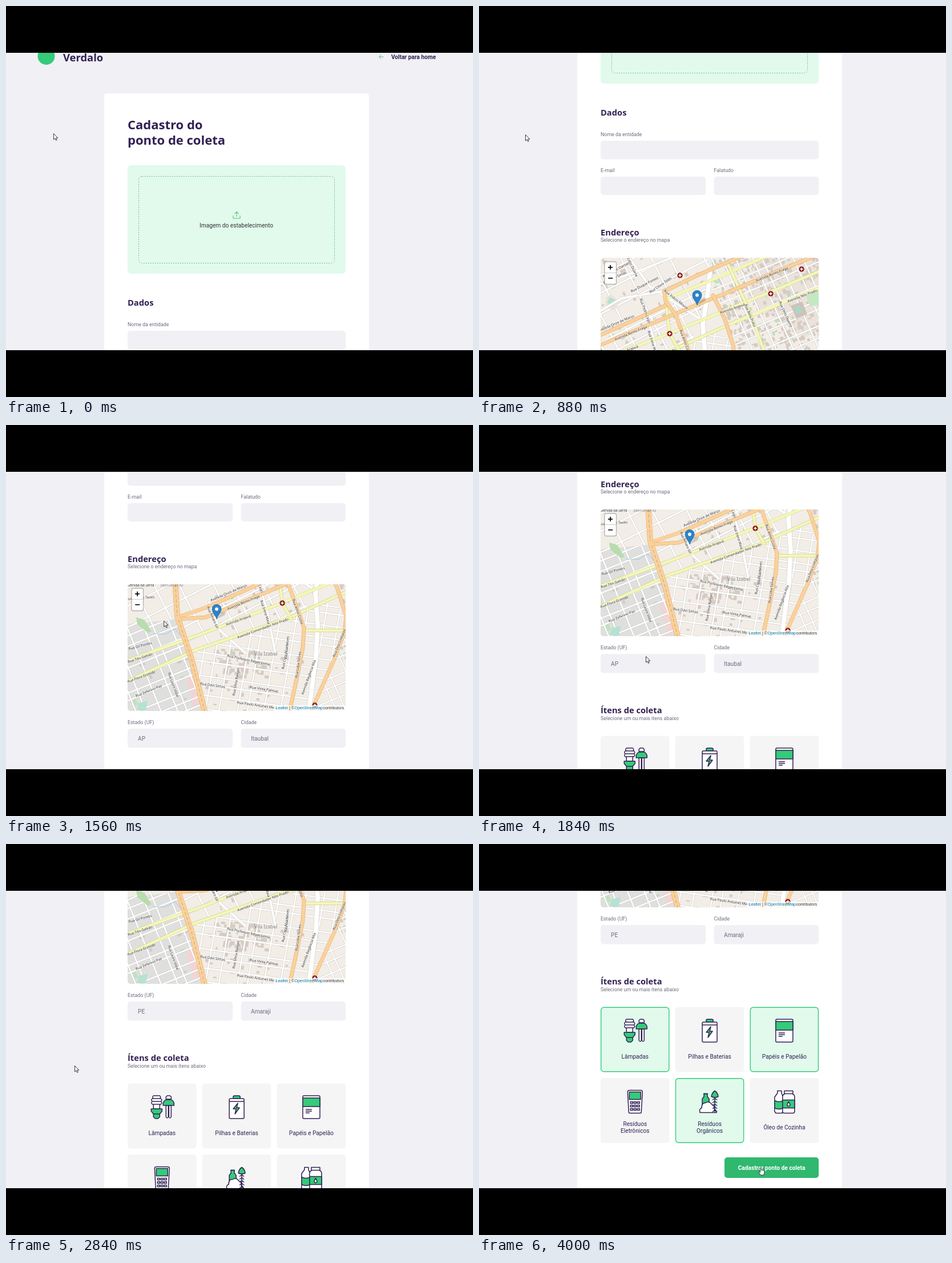
Recreate the animation shown at these times as an HTML page with a canvas. Size 818 by 685 pixels, loop 4160 ms.

```html
<!DOCTYPE html>
<html lang="pt-BR">
<head>
<meta charset="utf-8">
<title>Cadastro do ponto de coleta</title>
<style>
html, body { margin: 0; width: 100%; height: 100%; overflow: hidden; background: #000; }
canvas { display: block; }
</style>
</head>
<body>
<canvas id="stage" width="818" height="685"></canvas>
<script>
const LOOP = 4160, STEP = 40;
const TOP = 82, BOTTOM = 603;
const GREEN = '#34cb79', MINT = '#e1faec', INK = '#322153', FIELD = '#f0f0f5', GREY = '#6c6c80';
const HEAD = '"Open Sans", "Noto Sans", sans-serif';
const BODY = 'Roboto, sans-serif';
const MAP = { x: 213, y: 774, w: 382, h: 222, shift: 495 };
const WORLD = { x: 60, y: 270, w: 545, h: 340 };

const stage = document.getElementById('stage');
const screen = stage.getContext('2d');
let c = screen;

// ---------- helpers ----------
function text(str, x, y, font, color, align = 'left') {
  c.font = font;
  c.fillStyle = color;
  c.textAlign = align;
  c.fillText(str, x, y);
}

function box(x, y, w, h, r, fill, stroke, width = 1) {
  c.beginPath();
  c.roundRect(x, y, w, h, r);
  if (fill) { c.fillStyle = fill; c.fill(); }
  if (stroke) { c.strokeStyle = stroke; c.lineWidth = width; c.stroke(); }
}

function disc(x, y, r, fill) {
  c.beginPath();
  c.arc(x, y, r, 0, 7);
  c.fillStyle = fill;
  c.fill();
}

function trace(pts) {
  c.beginPath();
  for (let i = 0; i < pts.length; i += 2) c.lineTo(pts[i], pts[i + 1]);
}

function area(pts, fill) {
  trace(pts);
  c.closePath();
  c.fillStyle = fill;
  c.fill();
}

function within(pts, draw) {
  c.save();
  trace(pts);
  c.closePath();
  c.clip();
  draw();
  c.restore();
}

function random(seed) {
  return () => (seed = (seed * 16807) % 2147483647) / 2147483647;
}

// Interpolates rows of [time, ...values].
function track(rows, t, ease = k => k) {
  let i = 0;
  while (i < rows.length - 2 && t >= rows[i + 1][0]) i++;
  const [a, b] = [rows[i], rows[i + 1]];
  const k = ease(Math.min(1, Math.max(0, (t - a[0]) / (b[0] - a[0]))));
  return a.slice(1).map((v, n) => v + (b[n + 1] - v) * k);
}
const smooth = k => k * k * (3 - 2 * k);

// ---------- map ----------
const zones = {
  west: [60, 270, 400, 270, 410, 345, 370, 430, 290, 455, 180, 495, 150, 440, 60, 450],
  east: [400, 270, 605, 270, 605, 610, 385, 610, 425, 510, 447, 440, 410, 345],
  south: [180, 495, 290, 455, 370, 430, 420, 400, 447, 440, 425, 510, 385, 610, 197, 610],
  grey: [60, 450, 150, 440, 175, 510, 200, 610, 60, 610]
};

const yellow = [
  [60, 514, 190, 467, 330, 413, 444, 366, 520, 335, 605, 299],
  [60, 550, 180, 495, 290, 457, 350, 436, 440, 395, 520, 363, 605, 328],
  [326, 350, 334, 412, 350, 440],
  [330, 350, 420, 313, 510, 274],
  [436, 290, 468, 360, 484, 400, 502, 449],
  [372, 460, 445, 460, 510, 447, 605, 464]
];
const orange = [
  [153, 436, 200, 420, 270, 389, 330, 361],
  [153, 440, 200, 437, 265, 410, 385, 360, 440, 338, 510, 308, 605, 269],
  [324, 338, 382, 310, 470, 272],
  [324, 338, 327, 355, 345, 380, 372, 455, 370, 490, 358, 550, 345, 610],
  [410, 345, 430, 385, 446, 435, 443, 462, 425, 510, 383, 605]
];
const trunk = [146, 370, 150, 435, 175, 510, 200, 610];
const white = [
  [405, 300, 400, 345, 392, 395, 396, 450, 393, 505, 380, 605],
  [260, 275, 300, 330, 385, 385],
  [213, 372, 250, 350, 320, 338, 405, 300],
  [213, 325, 285, 300, 360, 270],
  [282, 345, 306, 420, 322, 500],
  [206, 410, 225, 460, 270, 500]
];

const labels = [
  ['Avenida Onze de Março', 240, 394, -23], ['Avenida Bento Fraga', 266, 411, -22],
  ['Avenida Arapuá', 257, 442, -20], ['Avenida Arapuá', 444, 368, -19],
  ['Avenida Comendador Nilo Prado', 300, 456, -20], ['Avenida Bento Fraga', 513, 308, -22],
  ['Avenida Nilo Prado', 566, 346, -21], ['Rua Duque Fontes', 290, 326, -27],
  ['Rua Clóvis Teles', 318, 327, -34], ['Rua Inácio Moura', 345, 352, 38],
  ['Rua Pedro Lago', 291, 372, 70], ['Rua Almir Costa', 361, 427, 70],
  ['Rua Irene Maia', 304, 428, 72], ['Rua Bela Prata', 475, 380, 68],
  ['Rua Célio Duarte', 537, 378, 66], ['Rua Otto Linhares', 434, 482, -68],
  ['Rua Rosa Viana', 550, 478, 25], ['Rua Nestor Reis', 573, 455, 11],
  ['Rua Mário Dantas', 240, 300, -28], ['Rua Davi Simas', 238, 314, -26],
  ['Rua Professor Edgar Leme', 275, 512, 12], ['Rua Vinte Palmas', 302, 563, 9],
  ['Rua Paulo Antunes Melo', 290, 591, 8], ['Rua Davi Simas', 212, 556, 8],
  ['Rua Lídia Torres', 362, 520, -82], ['Avenida Regência Alta', 380, 542, -70],
  ['Rua Cora Matos', 339, 505, -80], ['Rua Sílvia Rangel', 253, 550, -80],
  ['Rua Gil Pontes', 85, 487, -15], ['Rua Tito Galvão', 85, 508, -18],
  ['Rua Flora Gomide', 87, 541, -20], ['Rua Zeferino Paz', 100, 566, -22],
  ['Rua Lauro Vidal', 143, 555, 70], ['Avenida da Serra', 85, 381, 0],
  ['Rua Moacir Teves', 85, 403, -4], ['Rua Amaro Gil', 212, 437, 66],
  ['Rua Célio Duarte', 266, 290, 64], ['Rua Lia Neves', 342, 490, -85]
];
const clinics = [[352, 310], [565, 299], [511, 342], [334, 412], [391, 591]];

function road(pts, width, fill, edge) {
  c.lineJoin = c.lineCap = 'round';
  trace(pts);
  c.strokeStyle = edge; c.lineWidth = width + 1; c.stroke();
  c.strokeStyle = fill; c.lineWidth = width; c.stroke();
}

function grid(zone, across, down, du, dv, width) {
  const lines = (deg, gap) => {
    const a = deg * Math.PI / 180, dx = Math.cos(a) * 700, dy = Math.sin(a) * 700;
    c.beginPath();
    for (let n = -40; n < 40; n++) {
      const off = n * gap + Math.sin(n * 2.3) * gap * 0.18;
      const x = 330 - Math.sin(a) * off, y = 440 + Math.cos(a) * off;
      c.moveTo(x - dx, y - dy);
      c.lineTo(x + dx, y + dy);
    }
    c.stroke();
  };
  within(zone, () => {
    for (const [color, w] of [['#c9c5c0', width + 1], ['#fff', width]]) {
      c.strokeStyle = color;
      c.lineWidth = w;
      lines(across, du);
      lines(down, dv);
    }
  });
}

function buildings(zone, count, deg, [x0, y0, w, h], seed, size = 6) {
  const rnd = random(seed);
  within(zone, () => {
    for (let n = 0; n < count; n++) {
      c.save();
      c.translate(x0 + rnd() * w, y0 + rnd() * h);
      c.rotate(deg * Math.PI / 180);
      c.fillStyle = rnd() < 0.06 ? '#bfe2c0' : '#d6cbc2';
      c.fillRect(0, 0, 2 + rnd() * size, 2 + rnd() * size);
      c.restore();
    }
  });
}

function mapLabel(str, x, y, deg) {
  c.save();
  c.translate(x, y);
  c.rotate(deg * Math.PI / 180);
  c.font = '6.2px "Noto Sans", sans-serif';
  c.textAlign = 'center';
  c.lineWidth = 1.4;
  c.strokeStyle = 'rgba(255,255,255,.65)';
  c.strokeText(str, 0, 2);
  c.fillStyle = '#2c2c2c';
  c.fillText(str, 0, 2);
  c.restore();
}

function paintMap() {
  const sheet = document.createElement('canvas');
  sheet.width = WORLD.w;
  sheet.height = WORLD.h;
  c = sheet.getContext('2d');
  c.translate(-WORLD.x, -WORLD.y);
  c.fillStyle = '#f2ede6';
  c.fillRect(WORLD.x, WORLD.y, WORLD.w, WORLD.h);
  area(zones.grey, '#dfdfde');
  area([490, 270, 605, 270, 605, 400, 570, 420, 470, 350], '#ebe3db');
  area([165, 540, 180, 535, 195, 590, 180, 600], '#f3d4d4');

  buildings(zones.east, 700, -23, [405, 270, 200, 240], 91);
  buildings(zones.west, 80, -28, [213, 280, 180, 200], 17);
  buildings(zones.south, 50, 8, [215, 490, 90, 50], 33, 9);
  buildings(zones.south, 40, 8, [200, 480, 200, 120], 58);
  buildings(zones.grey, 10, -23, [70, 500, 110, 90], 45, 9);

  grid(zones.west, -27, 63, 35, 42, 3);
  grid(zones.east, -23, 66, 21, 22, 2.4);
  grid(zones.south, 8, -80, 19, 25, 2.6);
  grid(zones.grey, -22, 68, 18, 23, 2.6);

  area([78, 437, 92, 441, 105, 462, 98, 464, 80, 449], '#b7dcae');
  area([222, 349, 232, 343, 246, 357, 237, 371, 222, 366], '#e8e4d8');
  area([229, 348, 241, 354, 235, 363, 224, 358], '#b5e2d2');
  area([82, 587, 98, 583, 95, 600, 79, 600], '#b5e2d2');
  area([573, 346, 605, 328, 605, 360, 580, 364], '#c5e8c2');
  area([546, 363, 566, 356, 575, 378, 556, 386], '#cec2b8');
  area([551, 366, 563, 362, 568, 374, 557, 379], '#b0d3c4');
  area([445, 463, 491, 453, 498, 478, 480, 497, 451, 491], '#a9cfa4');
  c.strokeStyle = '#cfe3c5';
  c.lineWidth = 1;
  trace([446, 466, 480, 496, 468, 459, 455, 492, 495, 470]);
  c.stroke();
  c.strokeStyle = '#9cc9dd';
  trace([108, 466, 130, 466, 146, 457, 166, 480, 195, 462]);
  c.stroke();

  white.forEach((p, i) => road(p, i ? 4 : 8, '#fff', '#cbc6bf'));
  yellow.forEach(p => road(p, 4.6, '#f5f8b5', '#c5c88a'));
  orange.forEach(p => road(p, 5.6, '#fbd19b', '#dba663'));
  road(trunk, 9, '#fbd19b', '#dba663');
  c.setLineDash([5, 4]);
  c.strokeStyle = '#b49a78';
  c.lineWidth = 0.8;
  trace(trunk);
  c.stroke();
  c.setLineDash([]);
  disc(152, 438, 4, '#fbd19b');

  labels.forEach(l => mapLabel(...l));
  text('Vila Izabel', 305, 504, '8.5px "Noto Sans", sans-serif', '#858585', 'center');
  text('Seminário', 140, 383, '8.5px "Noto Sans", sans-serif', '#858585', 'center');
  text('Água Verde', 470, 488, 'italic 8.5px "Noto Sans", sans-serif', '#68806a', 'center');

  for (const [x, y] of clinics) {
    disc(x, y, 4.7, '#8a1717');
    c.fillStyle = '#fff';
    c.fillRect(x - 2.7, y - 0.8, 5.4, 1.6);
    c.fillRect(x - 0.8, y - 2.7, 1.6, 5.4);
  }
  c = screen;
  return sheet;
}
const mapSheet = paintMap();

function pin(x, y) {
  c.save();
  c.translate(x, y);
  area([0, 0, 9, -12, 16, -13, 14, -7], 'rgba(0,0,0,.16)');
  c.fillStyle = '#2b83cb';
  c.strokeStyle = '#2469a5';
  c.lineWidth = 0.9;
  const shape = new Path2D('M0 0C-2 -7 -8 -11 -8 -18A8 7.6 0 0 1 8 -18C8 -11 2 -7 0 0Z');
  c.fill(shape);
  c.stroke(shape);
  disc(0, -17.5, 2.9, '#fff');
  c.restore();
}

function drawMap(t) {
  const [px, py] = track([[1200, 0, 0], [1360, 150, -100]], t, smooth);
  c.save();
  c.beginPath();
  c.roundRect(MAP.x, MAP.y, MAP.w, MAP.h, 5);
  c.clip();
  const ox = Math.round(px), oy = Math.round(py) + MAP.shift;
  c.drawImage(mapSheet, WORLD.x + ox, WORLD.y + oy);
  if (t < 1440) pin(382 + ox, 362 + oy);
  else pin(219 + ox, 440 + oy);

  box(220, 781, 20.5, 39.5, 3, '#fff', 'rgba(0,0,0,.28)', 1.3);
  c.fillStyle = '#ccc';
  c.fillRect(220.5, 800, 19.5, 1);
  c.fillStyle = '#000';
  c.fillRect(226, 790, 8, 1.7);
  c.fillRect(229.2, 786.8, 1.7, 8);
  c.fillRect(226.3, 809, 8, 1.6);

  c.fillStyle = 'rgba(255,255,255,.72)';
  c.fillRect(469, 986, 126, 10);
  const small = '7px "Liberation Sans", sans-serif';
  text('Leaflet', 472.5, 993, small, '#0078a8');
  text('| ©', 496, 993, small, '#333');
  text('OpenStreetMap', 505.5, 993, small, '#0078a8');
  text('contributors', 592, 993, small, '#333', 'right');
  c.restore();
}

// ---------- item icons: [path, fill] around a centre ----------
const icons = [
  [
    ['M-15-20h11q3 2.500 0 5h-11q-3-2.500 0-5zM-17-15h15q3 2.500 0 5h-15q-3-2.500 0-5zM-17-10h15q3 2.500 0 5h-15q-3-2.500 0-5zM-15-5h11v8h-11z', '#fff'],
    ['M-19 3h19v4l-4 5v5l-3 3h-5l-3-3v-5l-4-5zM-15 12h11', GREEN],
    ['M7-14v-4l2-2h5l2 2v4zM7-3v20q2 4 4 0V-3zM12-3v20q2 4 4 0V-3z', '#fff'],
    ['M2-3v-4q2-6 6-6h7q4 0 6 6v4z', GREEN]
  ],
  [
    ['M-6-15v-4l2-1h8l2 1v4z', GREEN],
    ['M-13-13q0-2 2-2h22q2 0 2 2v31q0 2-2 2h-22q-2 0-2-2zM-13-10h26', '#fff'],
    ['M2-7l-8 10h5l-2 9 8-11h-5z', GREEN]
  ],
  [
    ['M-15-18q0-2 2-2h26q2 0 2 2v36q0 2-2 2h-26q-2 0-2-2z', '#fff'],
    ['M-15-16h30v15h-30z', GREEN],
    ['M-10 4h11M-10 7h11M-10 10h7']
  ],
  [
    ['M-13-17q0-3 3-3h20q3 0 3 3l-2 35q0 2-2 2h-18q-2 0-2-2z', '#fff'],
    ['M-10-17h20v13h-20z', GREEN],
    ['M-8 0h4v3h-4zM-2 0h4v3h-4zM4 0h4v3h-4zM-8 6h4v3h-4zM-2 6h4v3h-4zM4 6h4v3h-4zM-8 12h4v3h-4zM-2 12h4v3h-4zM4 12h4v3h-4z', '#fff']
  ],
  [
    ['M-10-14h6v5l3 4v12h-12v-12l3-4z', GREEN],
    ['M-11-14h8M-17 19q-2-7 3-8 0-10 7-9 6-4 11 3 5 1 4 8 4 2 4 6z', '#fff'],
    ['M9-8v26M5-3l4-3 4 3M5 2l4-3 4 3M5 7l4-3 4 3M5 12l4-3 4 3M5 18l4-4 4 4'],
    ['M3-9q1-7 6-10 5 3 6 10-6 3-12 0z', GREEN]
  ],
  [
    ['M-12-19h7v4l3 7v25l-2 3h-11l-2-3v-25l5-7z', '#fff'],
    ['M-17-2q8 4 15 0v13q-7 4-15 0z', GREEN],
    ['M0-19h15v5h-15zM1-14h13q4 2 4 5v26q0 3-3 3h-15q-3 0-3-3v-26q0-3 4-5z', '#fff'],
    ['M-3-3h21v14h-21z', GREEN],
    ['M7.500 0q5 7 0 8-5-1 0-8z', '#fff']
  ]
].map(icon => icon.map(([d, fill]) => [new Path2D(d), fill]));

function drawIcon(icon, x, y) {
  c.save();
  c.translate(x, y);
  c.strokeStyle = INK;
  c.lineWidth = 1.5;
  c.lineJoin = 'round';
  for (const [path, fill] of icon) {
    if (fill) { c.fillStyle = fill; c.fill(path); }
    c.stroke(path);
  }
  c.restore();
}

// ---------- page ----------
const names = [['Lâmpadas'], ['Pilhas e Baterias'], ['Papéis e Papelão'],
  ['Resíduos', 'Eletrônicos'], ['Resíduos', 'Orgânicos'], ['Óleo de Cozinha']];
const chosen = [
  t => t >= 3120,
  t => t >= 3200 && t < 3640,
  t => t >= 3320,
  () => false,
  t => t >= 3480,
  () => false
];

function drawItems(t) {
  names.forEach((lines, i) => {
    const x = 213 + (i % 3) * 130.75, y = i < 3 ? 1170.5 : 1295;
    if (chosen[i](t)) box(x + 0.7, y + 0.7, 119.2, 112.6, 5, MINT, GREEN, 1.4);
    else box(x, y, 120.6, 114, 5, '#f5f5f5');
    drawIcon(icons[i], x + 60.3, y + 41.5);
    const base = i < 3 ? y + 90 : lines.length > 1 ? y + 83.5 : y + 89.5;
    lines.forEach((s, n) => text(s, x + 60.3, base + n * 12, '10.17px ' + BODY, INK, 'center'));
  });
}

function label(str, x, y) { text(str, x, y, '8.9px ' + BODY, GREY); }
function title(str, y) { text(str, 213, y, '700 14.7px ' + HEAD, INK); }

function drawHeader() {
  disc(70.5, 88, 15, GREEN);
  text('Verdalo', 100, 96.5, '700 18.4px ' + HEAD, INK);
  c.strokeStyle = GREEN;
  c.lineWidth = 1;
  c.stroke(new Path2D('M661 89h-7M657 85.500l-3.500 3.500 3.500 3.500'));
  text('Voltar para home', 753, 92.5, '700 10.17px ' + BODY, INK, 'right');
}

function drawUpload() {
  box(213, 279, 382, 190, 6, MINT);
  c.setLineDash([2, 2]);
  box(232.5, 298.5, 343, 152, 6, null, '#74bd98');
  c.setLineDash([]);
  c.strokeStyle = '#4ecb79';
  c.lineWidth = 1.1;
  c.stroke(new Path2D('M398 367v5h12v-5M404 369v-8.500M400.500 364l3.500-3.500 3.500 3.500'));
  text('Imagem do estabelecimento', 403.5, 388, '10.17px ' + BODY, '#333', 'center');
}

function drawPage(t) {
  drawHeader();
  box(172, 153, 464, 1400, 5, '#fff');
  text('Cadastro do', 213, 216, '700 22px ' + HEAD, INK);
  text('ponto de coleta', 213, 243, '700 22px ' + HEAD, INK);
  drawUpload();

  title('Dados', 524.5);
  label('Nome da entidade', 213, 561);
  box(213, 569, 382, 32.5, 5, FIELD);
  label('E-mail', 213, 624);
  label('Falatudo', 411.5, 624);
  box(213, 632, 184, 32, 5, FIELD);
  box(411.5, 632, 183.5, 32, 5, FIELD);

  title('Endereço', 734.5);
  label('Selecione o endereço no mapa', 213, 746);
  drawMap(t);

  label('Estado (UF)', 213, 1019);
  label('Cidade', 411.5, 1019);
  box(213, 1027, 184, 33.5, 5, FIELD);
  box(411.5, 1027, 183.5, 33.5, 5, FIELD);
  text(t < 2200 ? 'AP' : 'PE', 231, 1047.5, '10.17px ' + BODY, GREY);
  text(t < 2600 ? 'Itaubal' : 'Amaraji', 429, 1047.5, '10.17px ' + BODY, GREY);

  title('Ítens de coleta', 1130.5);
  label('Selecione um ou mais ítens abaixo', 213, 1142.5);
  drawItems(t);
  box(430, 1434, 165, 36, 5, t >= 3840 ? '#2fb86e' : GREEN);
  text('Cadastrar ponto de coleta', 512.5, 1455.5, '700 10.17px ' + BODY, '#fff', 'center');
}

// ---------- motion ----------
const scroll = [[40, 0], [520, 170], [600, 170], [880, 333], [1080, 495], [1640, 495],
  [1760, 626], [2720, 626], [2840, 751], [2880, 751], [3040, 885]];
const pointer = [[0, 83, 223], [880, 81, 225], [1040, 81, 225], [1200, 297, 355],
  [1360, 447, 255], [1440, 369, 340], [1520, 369, 340], [1640, 11, 350], [1720, 45, 370],
  [1840, 292, 405], [2200, 292, 410], [2320, 480, 420], [2600, 480, 420], [2720, 120, 388],
  [3000, 120, 388], [3120, 272, 345], [3200, 404, 345], [3320, 520, 345], [3400, 415, 480],
  [3480, 415, 480], [3600, 404, 345], [3640, 404, 345], [3840, 493, 566], [4160, 493, 566]];
const arrow = new Path2D('M0 0v10.500l2.400-2.200 1.600 3.600 1.700-.8-1.600-3.500h3.200z');
const hand = new Path2D('M-1 1q1-1.500 2 0v4l1.500-.5 1.500.6 1.500.4 1 1v3l-1.500 4h-5l-3.500-4.500q0-1.500 1.500-1l1 1z');

function drawPointer(t) {
  const [x, y] = track(pointer, t, smooth);
  const shape = (t >= 1200 && t < 1480) || t >= 3080 ? hand : arrow;
  c.save();
  c.translate(x + 0.5, y + 0.5);
  c.fillStyle = '#fff';
  c.strokeStyle = '#222';
  c.lineWidth = 0.9;
  c.fill(shape);
  c.stroke(shape);
  c.restore();
}

function render(t) {
  c.fillStyle = '#000';
  c.fillRect(0, 0, 818, 685);
  c.save();
  c.beginPath();
  c.rect(0, TOP, 818, BOTTOM - TOP);
  c.clip();
  c.fillStyle = FIELD;
  c.fillRect(0, TOP, 818, BOTTOM - TOP);
  c.save();
  c.translate(0, -Math.round(track(scroll, t)[0]));
  drawPage(t);
  c.restore();
  drawPointer(t);
  c.restore();
}

const start = performance.now();
function tick() {
  const t = (performance.now() - start) % LOOP;
  render(Math.floor(t / STEP) * STEP);
  requestAnimationFrame(tick);
}
tick();
</script>
</body>
</html>
```
